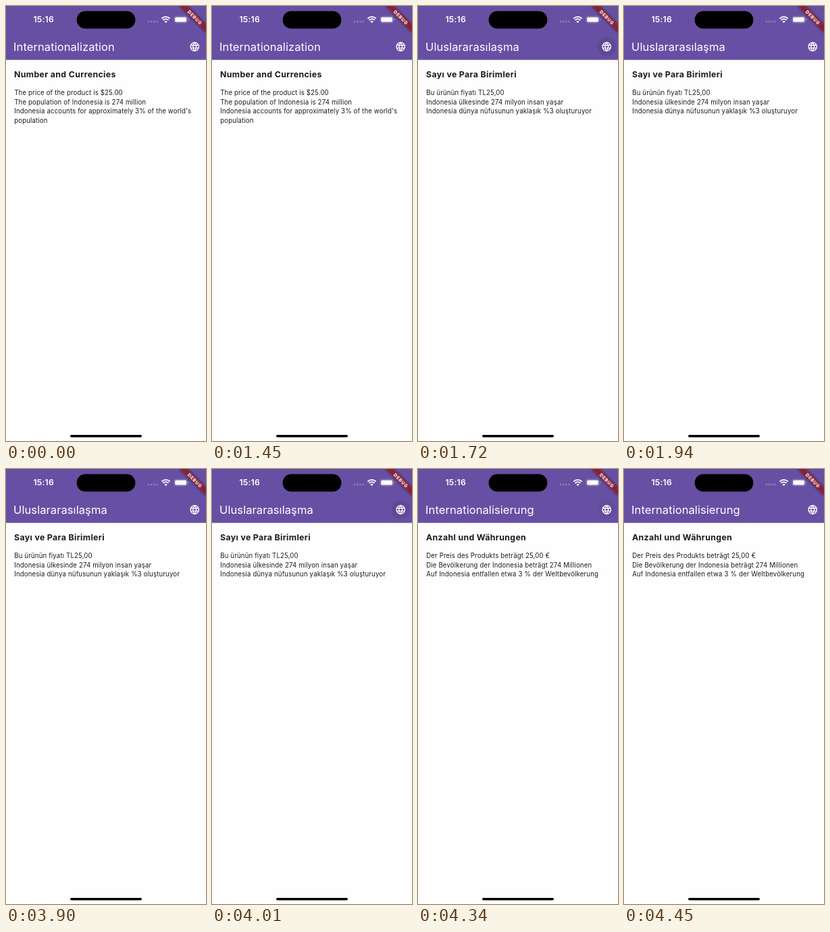
Animation of 296x640 px, one loop 6910 ms. Source, as an HTML page:

```html
<!DOCTYPE html>
<html lang="en">
<head>
<meta charset="utf-8">
<title>Internationalization</title>
<style>
  html, body { margin: 0; width: 100%; height: 100%; overflow: hidden; background: #fefefe; }
  svg { display: block; width: 296px; height: 640px; }
  text { font-family: Inter, Roboto, sans-serif; fill: #1c1b1f; }
  .clock { font-size: 12.2px; font-weight: 600; letter-spacing: .2px; text-anchor: middle; fill: #fff; }
  .title { font-size: 16.52px; letter-spacing: .07px; fill: #fff; }
  .head { font-size: 12.39px; font-weight: 700; letter-spacing: .32px; }
  .body { font-size: 9.64px; letter-spacing: .15px; }
  .debug { font-size: 9.6px; font-weight: 800; letter-spacing: 1.2px; text-anchor: middle; fill: #fff; }

  /* language switches at 1720 ms and 4130 ms */
  .lang { visibility: hidden; animation: 6910ms step-end infinite; }
  .en { animation-name: en; }
  .tr { animation-name: tr; }
  .de { animation-name: de; }
  @keyframes en { 0% { visibility: visible } 24.8915%, 100% { visibility: hidden } }
  @keyframes tr { 0% { visibility: hidden } 24.8915% { visibility: visible } 59.7685%, 100% { visibility: hidden } }
  @keyframes de { 0% { visibility: hidden } 59.7685%, 100% { visibility: visible } }

  /* press highlight behind the globe, once per switch */
  .press { opacity: 0; animation: press 6910ms linear infinite; }
  @keyframes press {
    0%, 22.87% { opacity: 0 }
    23.15%, 27.8% { opacity: .09 }
    28.07%, 56.44% { opacity: 0 }
    58.03%, 61.36% { opacity: .09 }
    64.4%, 100% { opacity: 0 }
  }
</style>
</head>
<body>
<svg viewBox="0 0 296 640">
  <defs>
    <filter id="soft" x="-20%" y="-80%" width="140%" height="260%">
      <feGaussianBlur stdDeviation="3"/>
    </filter>
  </defs>

  <rect width="296" height="640" fill="#fefefe"/>
  <rect width="296" height="79.3" fill="#6750a4"/>

  <!-- status bar -->
  <text class="clock" x="55.7" y="24.4">15:16</text>
  <rect x="104.6" y="7.6" width="86.8" height="25.6" rx="12.8"/>
  <g fill="#fff" fill-opacity=".28">
    <circle cx="211" cy="22.9" r="1.3"/>
    <circle cx="215.2" cy="22.9" r="1.3"/>
    <circle cx="219.4" cy="22.9" r="1.3"/>
    <circle cx="223.6" cy="22.9" r="1.3"/>
  </g>
  <g fill="none" stroke="#fff" stroke-width="1.8">
    <path d="M230.4 18.5a8.6 8.6 0 0 1 12.2 0"/>
    <path d="M232.5 20.9a5.6 5.6 0 0 1 8 0"/>
  </g>
  <path d="M236.5 25l-2.1-2.2a3 3 0 0 1 4.2 0z" fill="#fff"/>
  <rect x="248.8" y="15.2" width="19.6" height="9.6" rx="3" fill="none" stroke="#fff" stroke-opacity=".35" stroke-width=".7"/>
  <rect x="250.1" y="16.5" width="17" height="7" rx="1.8" fill="#fff"/>
  <path d="M269.6 18.4a1.7 1.7 0 0 1 0 3.2z" fill="#fff" fill-opacity=".4"/>

  <!-- globe button -->
  <g transform="translate(279.2 59.8) scale(.6884)" fill="none" stroke="#fff" stroke-width="2">
    <circle class="press" r="20" fill="#000" stroke="none"/>
    <circle r="9"/>
    <path d="M0 -9C-2.2 -6.2 -3.5 -3.2 -3.5 0S-2.2 6.2 0 9C2.2 6.2 3.5 3.2 3.5 0S2.2 -6.2 0 -9z"/>
    <path d="M-8.5 -3H8.5M-8.5 3H8.5"/>
  </g>

  <g class="lang en">
    <text class="title" x="11.1" y="65.6">Internationalization</text>
    <text class="head" x="12" y="104.5">Number and Currencies</text>
    <text class="body">
      <tspan x="12.2" y="130.8">The price of the product is $25.00</tspan>
      <tspan x="12.2" y="144.5">The population of Indonesia is 274 million</tspan>
      <tspan x="12.2" y="158.3">Indonesia accounts for approximately 3% of the world's</tspan>
      <tspan x="12.2" y="172">population</tspan>
    </text>
  </g>
  <g class="lang tr" lang="tr">
    <text class="title" x="11.1" y="65.6">Uluslararasılaşma</text>
    <text class="head" x="12" y="104.5">Sayı ve Para Birimleri</text>
    <text class="body">
      <tspan x="12.2" y="130.8">Bu ürünün fiyatı TL25,00</tspan>
      <tspan x="12.2" y="144.5">Indonesia ülkesinde 274 milyon insan yaşar</tspan>
      <tspan x="12.2" y="158.3">Indonesia dünya nüfusunun yaklaşık %3 oluşturuyor</tspan>
    </text>
  </g>
  <g class="lang de" lang="de">
    <text class="title" x="11.1" y="65.6">Internationalisierung</text>
    <text class="head" x="12" y="104.5">Anzahl und Währungen</text>
    <text class="body">
      <tspan x="12.2" y="130.8">Der Preis des Produkts beträgt 25,00 €</tspan>
      <tspan x="12.2" y="144.5">Die Bevölkerung der Indonesia beträgt 274 Millionen</tspan>
      <tspan x="12.2" y="158.3">Auf Indonesia entfallen etwa 3 % der Weltbevölkerung</tspan>
    </text>
  </g>

  <!-- corner ribbon -->
  <g transform="translate(296 0) scale(.6884) rotate(45)">
    <rect x="-40" y="28" width="80" height="12" fill-opacity=".5" filter="url(#soft)"/>
    <rect x="-40" y="28" width="80" height="12" fill="#b71c1c" fill-opacity=".63"/>
    <text class="debug" x=".6" y="37.4">DEBUG</text>
  </g>

  <rect x="95" y="631.1" width="106" height="3.4" rx="1.7"/>
</svg>
</body>
</html>
```
